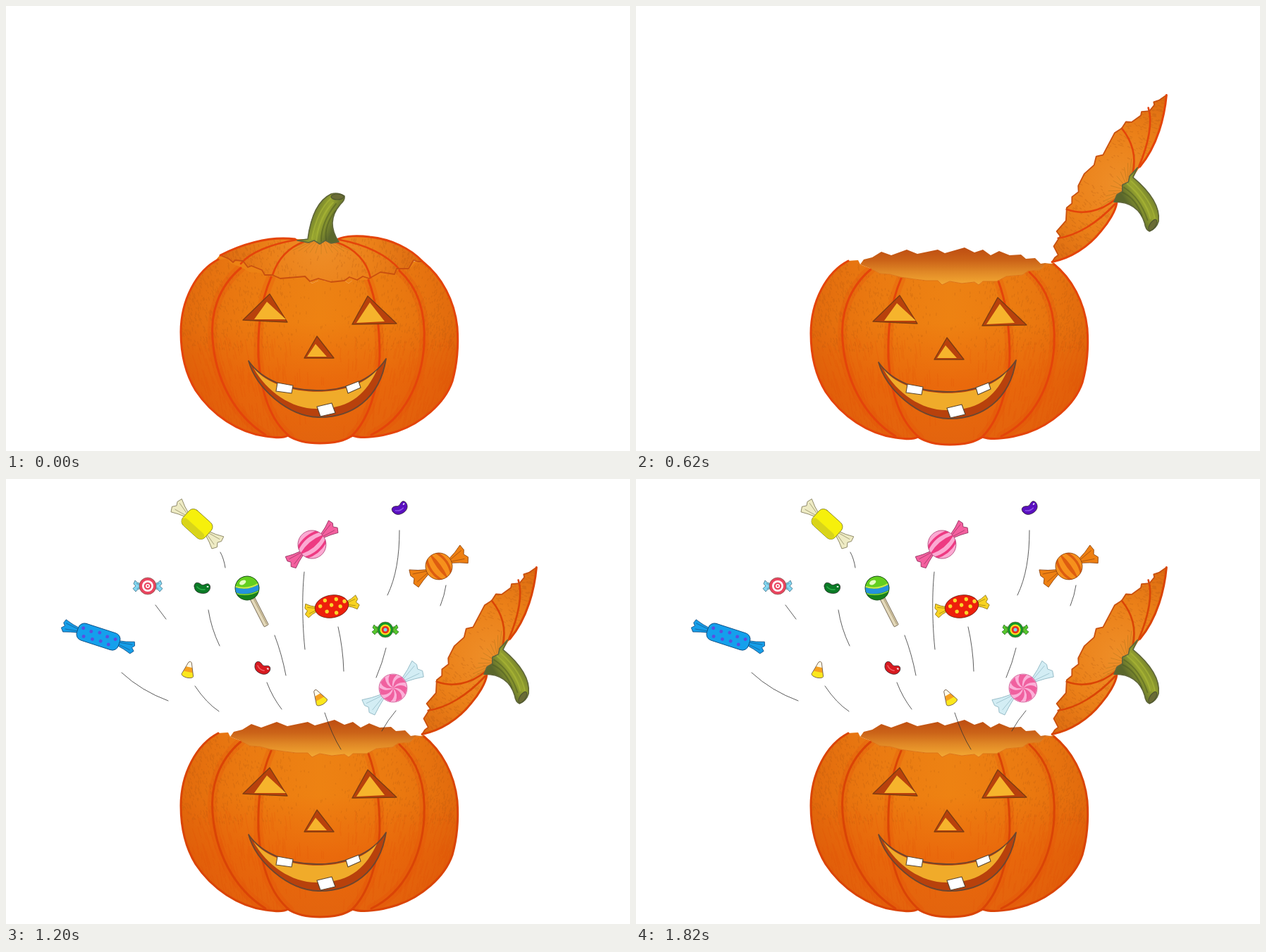
Animation of 885 by 632 pixels, one loop 2.07 s. Source, as an HTML page with a canvas:

```html
<!DOCTYPE html>
<html lang="en">
<head>
<meta charset="utf-8">
<title>Pumpkin full of sweets</title>
<style>
  html, body { margin: 0; width: 100%; height: 100%; overflow: hidden; background: #fff; }
  canvas { display: block; }
</style>
</head>
<body>
<canvas id="stage" width="885" height="632"></canvas>
<script>
const ctx = document.getElementById('stage').getContext('2d');
const TAU = Math.PI * 2;
const INK = '#6b5540';

// ---------- helpers ----------
function shape(d, fill, line, width = 1) {
  const p = d instanceof Path2D ? d : new Path2D(d);
  if (fill) { ctx.fillStyle = fill; ctx.fill(p); }
  if (line) { ctx.strokeStyle = line; ctx.lineWidth = width; ctx.stroke(p); }
}
function oval(x, y, rx, ry, fill, line, width) {
  const p = new Path2D();
  p.ellipse(x, y, rx, ry, 0, 0, TAU);
  shape(p, fill, line, width);
}
function box(x, y, w, h, r, fill, line, width) {
  const p = new Path2D();
  p.roundRect(x, y, w, h, r);
  shape(p, fill, line, width);
}
function placed(x, y, deg, draw) {
  ctx.save();
  ctx.translate(x, y);
  ctx.rotate(deg * Math.PI / 180);
  draw();
  ctx.restore();
}
function clipped(path, draw) {
  ctx.save();
  ctx.clip(path);
  draw();
  ctx.restore();
}
function gradient(g, ...colours) {
  colours.forEach((c, i) => g.addColorStop(i / (colours.length - 1), c));
  return g;
}
const linear = (x0, y0, x1, y1, ...colours) => gradient(ctx.createLinearGradient(x0, y0, x1, y1), ...colours);

// Chalky strokes, denser towards both sides of the pumpkin.
function grain(count, reach, top, height, length, colour, seed) {
  const rnd = () => (seed = (seed * 16807) % 2147483647) / 2147483647;
  ctx.strokeStyle = colour;
  ctx.lineWidth = 1.3;
  ctx.beginPath();
  for (let i = 0; i < count; i++) {
    const side = (rnd() < .5 ? -1 : 1) * Math.sqrt(rnd());
    const x = 445 + side * reach, y = top + rnd() * height, l = length * (.3 + rnd());
    ctx.moveTo(x, y);
    ctx.lineTo(x - side * l * .35 + rnd() - .5, y + l);
  }
  ctx.stroke();
}

// ---------- pumpkin ----------
const SIDES = 'M301,362 C270,378 248,420 248,465 C248,497 255,525 269,548 C292,583 330,608 368,613 ' +
  'C382,615 393,616 400,612 C412,620 430,623 445,623 C462,623 480,620 491,612 ' +
  'C505,617 530,614 555,606 C588,595 622,567 633,535 C640,510 642,485 640,458 C636,420 618,387 592,366';
const FRONT = ' L580,367 573,375 556,376 548,382 525,384 512,391 492,391 486,396 480,392 462,394 ' +
  '445,391 434,396 428,390 412,390 395,388 375,385 360,381 346,380 333,373';
const BODY = new Path2D(SIDES + FRONT + ' L318,367 315,361Z');
const HOLLOW = new Path2D('M318,367 L323,360 335,357 348,349 362,354 384,346 399,352 428,346 438,351 466,343 ' +
  '480,350 492,346 503,354 515,348 530,354 546,353 553,359 566,358 574,366 580,365 588,366' + FRONT + 'Z');
const SEAM = 'M294,367 L304,355 340,366 550,366 591,364 602,376 560,392 330,392Z';
const RIBS = ['M333,374 C300,402 290,440 293,475 C297,530 322,582 368,611',
  'M376,387 C360,425 357,460 358,500 C361,545 372,588 402,613',
  'M514,391 C525,420 530,460 530,500 C528,545 514,590 490,613',
  'M558,378 C588,405 595,445 593,482 C590,535 566,588 518,611'];

function face() {
  const rust = '#b8410c', edge = '#7d3c12', glow = '#f6b42c';
  shape('M374,411 L336,448 399,451Z', rust, edge, 1.4);
  shape('M370,422 L352,447 397,447Z', glow);
  shape('M513,414 L491,454 554,453Z', rust, edge, 1.4);
  shape('M516,423 L497,452 537,450Z', glow);
  shape('M441,471 L423,502 465,502Z', rust, edge, 1.4);
  shape('M439,482 L427,500 455,500Z', glow);
  shape('M344,506 C380,560 500,565 539,503 C530,560 490,587 443,586 C400,585 355,545 344,506Z', rust, '#6b4630', 1.8);
  shape('M351,516 C387,559 490,562 526,519 C512,550 490,575 440,574 C405,574 370,550 351,516Z', '#f0ab2a');
  for (const tooth of ['M385,537 L407,541 405,552 383,549Z', 'M482,542 L500,535 503,544 485,552Z', 'M441,571 L462,566 467,580 446,585Z'])
    shape(tooth, '#fff', '#5a4632', 1.1);
}

function pumpkin(closed, line) {
  const skin = '#ec8214';
  if (closed) shape(SEAM, skin);
  shape(HOLLOW, closed ? skin : linear(0, 345, 0, 394, '#bf4f12', '#cb6318', '#e08826', '#f2a632'));
  shape(BODY, linear(0, 365, 0, 623, skin, '#ee8212', '#ea6a0c', '#e3640e'));
  clipped(BODY, () => {
    ctx.fillStyle = linear(248, 0, 641, 0, 'rgba(208,72,4,.42)', 'rgba(222,84,6,.16)', 'rgba(230,90,6,0)', 'rgba(222,84,6,.16)', 'rgba(208,72,4,.42)');
    ctx.fillRect(240, 355, 410, 275);
    grain(1300, 198, 365, 125, 3, 'rgba(165,80,15,.2)', 7);
    grain(600, 200, 470, 140, 16, 'rgba(222,70,6,.15)', 23);
    for (const rib of RIBS) shape(rib, null, 'rgba(226,76,6,.22)', 13);
  });
  for (const rib of RIBS) shape(rib, null, line, 3);
  shape(SIDES, null, line, 3);
  if (!closed) shape('M592,366' + FRONT, null, '#dd7416', 1);
  face();
}

// ---------- lid ----------
const CUT = 'M303,354 L315,359 321,364 324,361 335,362 342,371 347,369 362,375 366,382 377,382 388,387 412,385 423,384 ' +
  '430,391 442,387 460,392 479,390 486,385 497,389 505,384 514,387 530,378 550,381 553,373 570,373 577,361 583,363 590,363';
const CROWN_RIGHT = 'C572,344 545,331 515,328 C500,326 480,326 470,331';
const CROWN_LEFT = 'C370,326 330,340 303,354';
const LID = new Path2D(`${CUT} ${CROWN_RIGHT} L409,331 ${CROWN_LEFT}Z`);
const LID_RIBS = ['M411,332 C375,338 345,350 332,366', 'M421,335 C400,343 385,358 377,382',
  'M466,335 C495,344 511,364 516,386', 'M472,332 C510,339 540,354 557,374'];

function lid(deg, dy, line) {
  placed(591, 364 + dy, deg, () => {
    ctx.translate(-590, -362);
    shape(LID, gradient(ctx.createRadialGradient(446, 338, 5, 446, 350, 145), '#ee8e28', '#eb8018', '#dc6a10'));
    clipped(LID, () => {
      grain(600, 143, 328, 62, 3, 'rgba(160,78,15,.2)', 11);
      for (let i = -6; i < 7; i++)
        shape(`M${446 + i * 3},335 L${446 + i * 8},${352 - Math.abs(i)}`, null, 'rgba(120,100,20,.3)', .8);
    });
    for (const rib of LID_RIBS) shape(rib, null, line, 2.6);
    shape(CUT, null, '#c9500f', 1.8);
    shape('M590,363 ' + CROWN_RIGHT, null, line, 3);
    shape('M409,331 ' + CROWN_LEFT, null, line, 3);
    shape('M412,333 L427,331 C430,308 437,278 460,267 Q470,264 479,270 Q480,276 473,282 C456,302 461,320 471,335 L460,337 452,333 444,338 436,333 428,336Z',
      linear(430, 295, 466, 312, '#6d7a2c', '#98a52f', '#5a672c'), '#5f653a', 1.6);
    shape('M433,330 C437,308 445,287 460,273 M439,333 C442,310 451,291 463,279', null, 'rgba(172,186,55,.6)', 2);
    shape('M446,334 C446,315 454,297 467,281 M453,332 C451,318 456,304 466,291', null, 'rgba(70,82,32,.45)', 2);
    oval(469, 271, 9, 4, '#6a6c35', '#4f5630', 1.2);
  });
}

// ---------- sweets, each drawn around its own centre ----------
function wings(inner, outer, half, fill, line = INK) {
  for (const s of [-1, 1]) {
    ctx.save();
    ctx.scale(s, 1);
    shape(`M${inner},-3 Q${(inner + outer) / 2},${-half * .55} ${outer - 3},${-half} L${outer - 1},${-half * .4} ${outer - 4},0 ` +
      `${outer},${half * .45} ${outer - 4},${half} Q${(inner + outer) / 2},${half * .6} ${inner},3Z`, fill, line, .8);
    shape(`M${inner},-1 L${outer - 5},${-half * .45} M${inner},1 L${outer - 6},${half * .45}`, null, line, .6);
    ctx.restore();
  }
}
function disc(r) {
  const p = new Path2D();
  p.arc(0, 0, r, 0, TAU);
  return p;
}
function rings(...pairs) {
  pairs.forEach(([r, colour], i) => oval(0, 0, r, r, colour, i ? null : INK, .6));
}
function striped(r, base, stripe, middle, line) {
  shape(disc(r), base);
  clipped(disc(r), () => {
    shape(`M${-r},-1 Q0,${-middle} ${r},-1 L${r},1 Q0,${middle} ${-r},1Z`, stripe);
    shape(`M${-r},-8 Q0,-17 ${r},-8 M${-r},8 Q0,17 ${r},8`, null, stripe, 3.5);
  });
  shape(disc(r), null, line, .8);
}
function dots(list, r, colour) {
  for (const [x, y] of list) oval(x, y, r, r, colour);
}
function bean(colour, light) {
  shape('M-11,-3 C-11,-9 -5,-9 -1,-5 C3,-3 5,-7 9,-6 C14,-4 12,7.5 2,7.5 C-6,7.5 -11,4 -11,-3Z', colour, '#2a2226', .7);
  shape('M-7,-2 Q-3,3 4,2', null, light, 1.5);
  oval(8, -2, 1.5, 1, '#fff');
}
function corn() {
  const kernel = new Path2D('M-2,-11 Q0,-13 2,-11 L8.5,8 Q8,11 0,11.5 Q-8,11 -8.5,8Z');
  clipped(kernel, () => {
    ctx.fillStyle = '#fffbe9'; ctx.fillRect(-10, -13, 20, 10);
    ctx.fillStyle = '#f6a01f'; ctx.fillRect(-10, -4, 20, 8);
    ctx.fillStyle = '#fbe71d'; ctx.fillRect(-10, 3, 20, 9);
  });
  shape(kernel, null, INK, .8);
}

const SWEETS = {
  yellow() {
    wings(18, 43, 12, '#eeebc4', '#7f7a55');
    box(-21, -14.5, 42, 29, 8, '#f6f00c', '#7b7820', .8);
    box(-20, 4, 40, 9.5, 5, '#d9d41a');
  },
  target() {
    wings(10, 21, 8, '#83d8f2', '#3d6c86');
    rings([12, '#ea4560'], [8, '#fff'], [5.3, '#ea4560'], [3, '#fff'], [1.4, '#ea4560']);
  },
  greenBean() { bean('#0b7a26', '#2fae4c'); },
  lolly() {
    box(-3.5, 14, 7, 46, 1, '#e3d8ba', '#6b5e48', .8);
    shape('M1.5,18 V58', null, '#b7a883', 1.5);
    const ball = disc(17);
    shape(ball, '#15821c');
    clipped(ball, () => {
      ctx.rotate(.35);
      shape('M-18,-20 H18 V-4 Q0,4 -18,-4Z', '#63cf1e');
      shape('M-18,-4 Q0,5 18,-4 V4 Q0,12 -18,4Z', '#2492dc');
      shape('M-18,-5 Q0,4 18,-5', null, '#c9ec4c', 2);
      shape('M-18,5 Q0,13 18,5', null, '#8cd83a', 1.3);
    });
    shape(ball, null, '#1d4f1e', .9);
    oval(-2, -10, 5, 3, '#e4fbc0');
  },
  pink() {
    wings(18, 43, 11, '#f4609f', '#8f2b5a');
    striped(20, '#fba9d2', '#ee3a82', 8, '#b04a7c');
  },
  orange() {
    wings(17, 43, 14, '#ee8012', '#8f420c');
    placed(0, 0, 80, () => striped(19, '#f6901c', '#dd5c10', 5, '#8f420c'));
  },
  red() {
    wings(21, 39, 10, '#f8d321', '#8a7012');
    oval(0, 0, 24, 16, '#ee1f0c', '#6b1c10', .8);
    dots([[-16, -3], [-8, -10], [-8, 6], [0, -2], [5, 10], [8, -9], [12, 2], [19, -4]], 2.7, '#f9d72a');
  },
  blue() {
    wings(27, 54, 9, '#169ee8', '#124f86');
    box(-31, -12.5, 62, 25, 9, '#14a0ec', '#124f86', .9);
    dots([[-24, -5], [-20, 6], [-12, -4], [-7, 6], [0, -6], [5, 5], [12, -4], [17, 6], [24, -4]], 2.4, '#5a4fe0');
  },
  purpleBean() { bean('#5a0fc0', '#8b4fe6'); },
  greenTarget() {
    wings(9, 19, 7, '#58c92c', '#236b1c');
    rings([11, '#109a26'], [7.6, '#f9e11e'], [5.3, '#ea3021'], [2.5, '#7fd0ee']);
  },
  swirl() {
    wings(18, 48, 14, '#d3edf4', '#8bb4c0');
    shape(disc(20), '#fbb0d8');
    for (let i = 0; i < 7; i++)
      placed(0, 0, i * 360 / 7, () => shape('M0,0 Q9,-10 19,-5 L19,5 Q10,-4 0,0Z', '#f0609f'));
    shape(disc(20), null, '#d0649a', .8);
  },
  cornLeft: corn,
  cornRight: corn,
  redBean() { bean('#d81a20', '#f2656a'); }
};

// x, y, angle of each sweet
const BURST = {
  yellow: [319, 118, 59], target: [236, 185, 27], lolly: [378, 236, -23], pink: [458, 183, -48],
  orange: [532, 251, -14], greenBean: [378, 307, 28], blue: [362, 349, 32], red: [475, 343, -42], purpleBean: [549, 360, -24]
};
const HIGH = {
  yellow: [271, 64, 42], target: [201, 152, 0], lolly: [342, 155, -27], pink: [434, 93, -40],
  orange: [614, 124, -26], greenBean: [278, 155, 0], blue: [131, 224, 18], red: [462, 181, -10], purpleBean: [559, 42, -38],
  greenTarget: [538, 214, 0], swirl: [549, 297, -38], cornLeft: [259, 271, 12], cornRight: [444, 310, -30], redBean: [363, 269, 18]
};
const SWAY = {
  yellow: [270, 65, 39], target: [201, 153, 3], lolly: [343, 157, -24], pink: [434, 94, -43],
  orange: [613, 125, -34], greenBean: [278, 158, 4], blue: [131, 225, 22], red: [461, 182, -6], purpleBean: [558, 44, -34],
  greenTarget: [537, 215, -3], swirl: [549, 298, -42], cornLeft: [258, 271, 3], cornRight: [443, 311, -20], redBean: [362, 270, 24]
};

// trails behind the sweets
const BURST_TRAILS = 'M252,209 C262,240 290,268 319,288 M353,159 Q370,168 384,192 M470,215 Q470,245 463,272 ' +
  'M409,272 C420,295 421,325 425,355 M544,280 C541,315 530,345 511,369 M390,324 C394,348 410,365 423,378 ' +
  'M349,356 Q353,370 367,378 M478,364 Q475,380 464,391 M518,381 Q528,379 535,373';
const SHARED_TRAILS = 'M164,275 Q192,301 230,315 M304,104 Q309,113 311,126 M381,222 Q391,248 397,279 ' +
  'M423,132 C419,170 421,215 424,242 M558,73 C558,110 553,140 541,165 M539,240 Q534,261 525,282 ' +
  'M553,329 Q541,343 533,358 M452,332 Q462,363 475,384 ';
const SHORT_TRAILS = SHARED_TRAILS + 'M212,179 L227,199 M287,186 Q291,212 303,237 M268,294 Q284,318 302,330 ' +
  'M370,289 Q378,310 391,327 M471,210 Q478,240 479,273 M624,151 Q622,165 616,180';
const LONG_TRAILS = SHARED_TRAILS + 'M212,180 Q245,222 263,241 M287,187 C297,245 320,285 345,303 ' +
  'M268,295 C290,330 325,355 368,368 M370,290 C385,325 415,360 448,382 M471,211 C482,260 479,320 482,369 M624,152 Q615,195 596,222';

// ---------- timeline ----------
const LOOP = 2070;
const high = { lid: 122.6, dy: -1, sweets: HIGH, trails: SHORT_TRAILS };
const STEPS = [
  { until: 330, lid: 0, dy: -2 },
  { until: 620, lid: 52.7, dy: 0 },
  { until: 910, lid: 122.6, dy: 0 },
  { until: 1200, lid: 122.6, dy: 0, sweets: BURST, trails: BURST_TRAILS },
  { until: 1490, ...high },
  { until: 1820, lid: 122.6, dy: 0, sweets: SWAY, trails: LONG_TRAILS },
  { until: LOOP, ...high }
];

function draw(step) {
  const line = step.sweets ? '#da4406' : '#e4440a';
  ctx.fillStyle = '#fff';
  ctx.fillRect(0, 0, 885, 632);
  ctx.lineJoin = ctx.lineCap = 'round';
  placed(0, step.dy, 0, () => pumpkin(!step.lid, line));
  lid(step.lid, step.dy, line);
  if (!step.sweets) return;
  shape(step.trails, null, '#333', .8);
  for (const name in step.sweets) placed(...step.sweets[name], SWEETS[name]);
}

let shown;
function tick() {
  const t = performance.now() % LOOP;
  const step = STEPS.find(s => t < s.until);
  if (step !== shown) draw(shown = step);
  requestAnimationFrame(tick);
}
tick();
</script>
</body>
</html>
```
